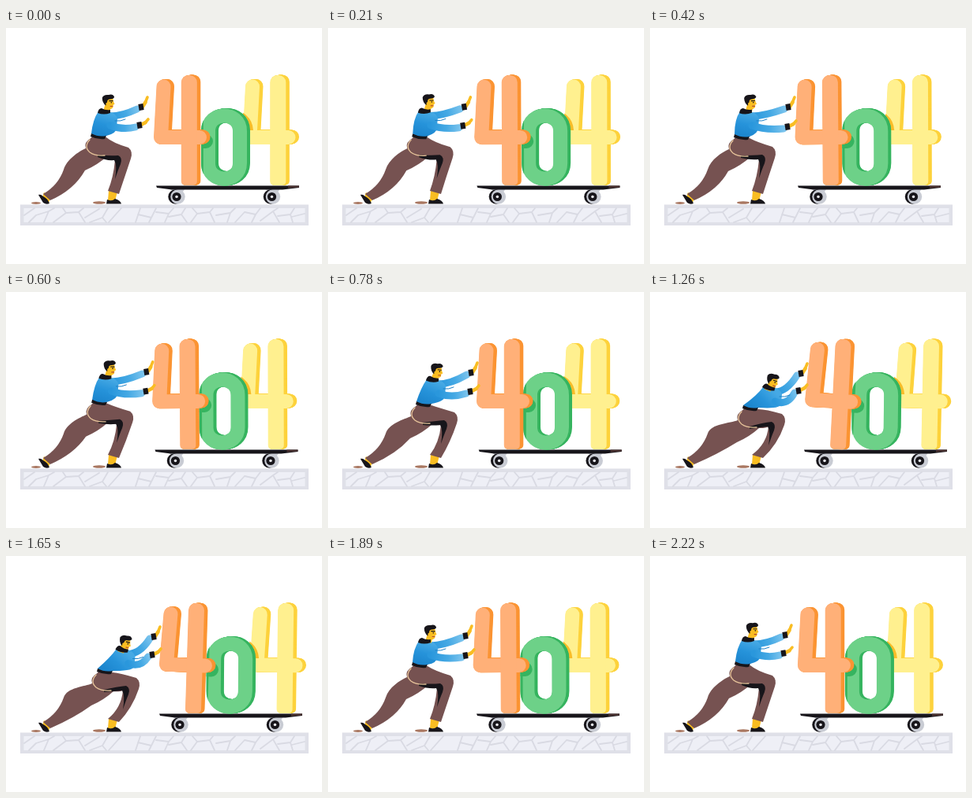
Animation of 400x300 px, one loop 2.25 s. Source, as an HTML page with a canvas:

```html
<!DOCTYPE html>
<html lang="en">
<head>
<meta charset="utf-8">
<title>404</title>
<style>
  html, body { margin: 0; width: 100%; height: 100%; overflow: hidden; background: #fff; }
  canvas { display: block; width: 400px; height: 300px; }
</style>
</head>
<body>
<canvas id="stage"></canvas>
<script>
const LOOP = 2250, STEP = 30;
const TIMES = [0, 420, 780, 1260, 1650, 1890];

// One value (or point) per entry in TIMES; the loop closes on the first.
const TRACKS = {
  deck: [0, -3, 0.7, 5, 4, -2],
  four: [0, -3, 1, 6, 5, -3],
  lean: [0, -0.4, 0, 2.9, 1.8, -0.3],
  zero: [0, -3.6, 0, 8.3, 6.6, -3.5],
  last: [0, -2, -1.7, 9, 8.2, -2.4],
  head: [[129, 95], [126.5, 95], [137, 101], [154, 114], [150, 111], [129, 98]],
  neck: [[123, 107], [120, 107], [131, 112], [149, 122], [145.5, 119.5], [121, 109]],
  hip: [[114, 137], [113, 138], [118, 142], [124, 147], [122, 146], [113, 138]],
  knee: [[151, 160], [151, 159], [156, 161], [163, 163], [161, 163], [151, 160]],
  cuffA: [[171, 102], [175, 102], [181, 104], [191, 105], [187, 104], [174, 103]],
  cuffB: [[169, 125], [174, 127], [180, 128], [188, 127], [185, 127], [174, 128]]
};

const INK = '#17151a', SKIN = '#f9bd22', CLOTH = '#765251', MUD = '#a97761';
const canvas = document.getElementById('stage');
const c = canvas.getContext('2d');
const ratio = window.devicePixelRatio || 1;
canvas.width = 400 * ratio;
canvas.height = 300 * ratio;

// Periodic cubic through uneven keys.
function spline(values, t) {
  const n = TIMES.length;
  const wrap = i => (i + n) % n;
  const at = i => TIMES[wrap(i)] + Math.floor(i / n) * LOOP;
  const val = i => values[wrap(i)];
  let i = n - 1;
  while (t < TIMES[i]) i--;
  const span = at(i + 1) - at(i), u = (t - at(i)) / span;
  const slope = k => (val(k + 1) - val(k - 1)) / (at(k + 1) - at(k - 1)) * span;
  const v = 1 - u;
  return val(i) * v * v * (1 + 2 * u) + slope(i) * u * v * v +
         val(i + 1) * u * u * (3 - 2 * u) - slope(i + 1) * u * u * v;
}

function pose(t) {
  const p = {};
  for (const [name, keys] of Object.entries(TRACKS)) {
    p[name] = Array.isArray(keys[0])
      ? [0, 1].map(k => spline(keys.map(q => q[k]), t))
      : spline(keys, t);
  }
  return p;
}

const off = (p, x, y) => [p[0] + x, p[1] + y];

function fill(d, color) {
  c.fillStyle = color;
  c.fill(new Path2D(d));
}

function stroke(d, color, width, cap = 'round') {
  c.strokeStyle = color;
  c.lineWidth = width;
  c.lineCap = cap;
  c.lineJoin = 'round';
  c.stroke(new Path2D(d));
}

function disc(x, y, r, color) {
  c.fillStyle = color;
  c.beginPath();
  c.arc(x, y, r, 0, Math.PI * 2);
  c.fill();
}

function oval(x, y, rx, ry, color) {
  c.fillStyle = color;
  c.beginPath();
  c.ellipse(x, y, rx, ry, 0, 0, Math.PI * 2);
  c.fill();
}

function layer(x, y, angle, draw) {
  c.save();
  c.translate(x, y);
  c.rotate(angle);
  draw();
  c.restore();
}

function blend(from, to, ...stops) {
  const g = c.createLinearGradient(...from, ...to);
  stops.forEach((s, i) => g.addColorStop(i / (stops.length - 1), s));
  return g;
}

function pavement() {
  fill('M18 224.5H383V251H18Z', '#dfe0e8');
  fill('M22.5 229H378.5V247H22.5Z', '#eeeff6');
  stroke('M23 238L36 229M29 247L38 238L54 233L61 229M54 233L48 247' +
    'M60 247L76 235L92 234L98 229M76 235L72 229M92 234L100 247M100 241L118 230' +
    'M106 247L122 241L129 229M122 241L127 247M130 247L146 229' +
    'M164 247L170 229M167 237L184 241L190 229M184 241L181 247' +
    'M190 234L206 236L212 229M206 236L201 247M206 240L222 237L229 247M222 237L227 229' +
    'M234 247L242 236L258 234L262 229M242 236L236 229M258 234L264 247' +
    'M266 238L284 235L290 229M284 235L280 247M290 247L302 234L316 237L322 229' +
    'M316 237L311 247M322 245L338 233L344 229M338 233L346 247M344 239L360 237L365 229' +
    'M360 237L363 247M362 240L378 236', '#d9dae3', 1.8);
}

function board(x) {
  layer(x, 0, 0, () => {
    for (const w of [216, 336.5]) {
      fill(`M${w - 8} 205H${w + 10}L${w + 6} 211H${w - 2}Z`, '#c9ccd4');
      disc(w - 1.5, 214.5, 9.2, INK);
      disc(w + 1.5, 214.5, 9.2, '#c9ccd4');
      disc(w, 214.5, 5.6, INK);
      disc(w, 214.5, 1.8, '#e8e9ee');
    }
    fill('M190 200.5H371V203L350 205.5H210L191 203Z', INK);
    fill('M357 200.5H371V202.5L357 203.5Z', '#4a3231');
  });
}

function fourShape(color) {
  stroke('M-33.5 -126.5L-37 -62H12', color, 18);
  c.fillStyle = color;
  c.beginPath();
  c.roundRect(-11.2, -141, 20, 140, [9, 9, 5, 5]);
  c.fill();
}

// Depth is built from shifted copies running to the right.
function extrude(depth, shape, face, side) {
  for (let k = depth; k > 0; k -= 0.5) layer(k, -k / 8, 0, () => shape(side));
  shape(face);
}

const zeroPath = r => `M${-r} -70C${-r} -96 ${r} -96 ${r} -70V-29C${r} -3 ${-r} -3 ${-r} -29Z`;
const zeroShape = color => stroke(zeroPath(20), color, 18);

function digits(p) {
  const lean = p.lean * Math.PI / 180;
  const first = [233 + p.four, 201, lean];
  const middle = [276 + p.zero, 201, lean * 0.25];
  const third = [345.5 + p.last, 201, lean * 0.4];

  layer(...third, () => extrude(4.5, fourShape, '#fff08f', '#fdd23c'));
  c.save();
  c.beginPath();
  c.rect(300 + p.last, 90, 22, 40);
  c.clip();
  layer(middle[0] + 8, middle[1] + 1, middle[2], () => zeroShape('#f9bd28'));
  c.restore();

  layer(...middle, () => extrude(4, zeroShape, '#6dd188', '#36b45f'));
  c.save();
  c.translate(middle[0], middle[1]);
  c.clip(new Path2D('M-29 -70C-29 -108 29 -108 29 -70V-29C29 9 -29 9 -29 -29Z'));
  c.translate(-middle[0], -middle[1]);
  layer(first[0] + 8, first[1] + 5, lean, () => fourShape('#36b45f'));
  c.restore();

  layer(...first, () => extrude(4.5, fourShape, '#ffb078', '#fb9433'));
}

function legs(hip, knee) {
  const h = (x, y) => off(hip, x, y), k = (x, y) => off(knee, x, y);

  oval(38, 222.5, 6, 1.5, MUD);
  fill('M48 209L57 215L54 222L46 216Z', SKIN);
  fill('M41 212Q44 211 47 214Q53 217 55 223Q51 225 47 222Z', INK);

  fill(`M${h(-5, 2)}Q${h(-16, 8)} ${h(-13, 16)}C${h(-22, 20)} 77 167 73 180` +
    `Q66 200 47 211L56 219Q86 206 ${h(-14, 44)}Q${h(2, 37)} ${h(14, 26)}L${h(10, 8)}Z`, CLOTH);

  oval(118, 222, 8, 1.7, MUD);
  fill('M130 207L141 208L138 220L129 219Z', SKIN);
  fill('M128 218Q134 221 138 217Q145 219 146 223.5H127Z', INK);

  fill(`M${h(-5, 1)}L${h(13, 2)}Q${k(-16, -14)} ${k(4, -8)}Q${k(10, -3)} ${k(7, 6)}` +
    `Q${k(-1, 30)} 143 211L129 207Q${k(-15, 30)} ${k(-13, 8)}` +
    `Q${h(20, 28)} ${h(-4, 24)}Q${h(-16, 17)} ${h(-5, 1)}Z`, CLOTH);
  fill(`M${h(2, 24)}Q${k(-20, 3)} ${k(-9, 2)}Q${k(-3, 5)} ${k(-6, 13)}` +
    `Q${k(-9, 20)} ${k(-13, 32)}Q${k(-10, 14)} ${k(-14, 8)}Q${k(-24, 9)} ${h(2, 27)}Z`, INK);
  stroke(`M${h(-8, 5)}Q${h(-16, 14)} ${h(-8, 21)}Q${h(-1, 26)} ${h(11, 25)}`, '#e8c59b', 1.3);
}

function hand(cuff, dx, dy) {
  const p = (x, y) => off(cuff, x, y);
  stroke(`M${p(2, -2)}L${p(dx * 0.7, dy * 0.55)}`, SKIN, 4.5);
  stroke(`M${p(dx * 0.65, dy * 0.5)}L${p(dx, dy)}`, SKIN, 3.6);
}

function arm(from, bend, cuff) {
  const tone = blend(from, cuff, '#2a97dc', '#45a9e4', '#86c9ef');
  stroke(`M${from}Q${bend} ${off(cuff, -5, 1)}`, tone, 9);
  stroke(`M${off(cuff, -3, -1)}L${off(cuff, 3, -2)}`, INK, 8, 'butt');
}

function face(head, tilt) {
  layer(head[0], head[1], tilt, () => {
    c.scale(0.9, 0.9);
    fill('M-4 3L4 7L2 14L-7 13Z', SKIN);
    fill('M-3 -6H7L8 -1L9.5 2L7.5 3L7 7Q3 11 0 8L-4 3Z', SKIN);
    fill('M-8 -7Q-6 -12 1 -11Q7 -13 9 -8Q8 -5 3 -5Q-1 -5 -1 -1L-3 4Q-8 0 -8 -7Z', INK);
    disc(-1, 1.5, 1.8, SKIN);
    stroke('M2 -2.6H6.8', INK, 1.2);
    disc(4.8, -0.3, 0.9, INK);
    stroke('M3.5 5H6.5', '#b4482d', 1.3);
  });
}

function person(p) {
  const { head, neck, hip, knee, cuffA, cuffB } = p;
  const n = (x, y) => off(neck, x, y), h = (x, y) => off(hip, x, y);
  const tilt = (head[0] - 129) * 0.011;

  legs(hip, knee);
  hand(cuffA, 8, -14);
  hand(cuffB, 11, -9);
  arm(n(9, 5), n(24, 5), cuffA);
  fill(`M${h(-6, -3)}L${h(13, 0)}L${h(11, 4)}Q${h(2, 5)} ${h(-7, 1)}Z`, INK);
  fill(`M${n(-6, -1)}Q${n(-13, 9)} ${h(-6, -3)}Q${h(3, 2)} ${h(13, 0)}` +
    `Q${n(17, 27)} ${n(17, 20)}L${n(18, 8)}Q${n(15, 0)} ${n(7, 0)}Z`,
    blend(n(4, 0), h(4, 0), '#46a9e4', '#2693da', '#1c85cd'));
  arm(n(9, 17), n(25, 23), cuffB);
  stroke(`M${n(15, 11)}Q${n(22, 12)} ${n(28, 9)}`, '#1d80c6', 1);
  face(head, tilt);
  layer(neck[0], neck[1], tilt, () => {
    fill('M-7 1Q-6 -5 -2 -5Q3 -2 9 -3L9 1Q1 4 -7 1Z', INK);
  });
}

function draw(t) {
  const p = pose(t);
  c.setTransform(ratio, 0, 0, ratio, 0, 0);
  c.fillStyle = '#fff';
  c.fillRect(0, 0, 400, 300);
  pavement();
  board(p.deck);
  digits(p);
  person(p);
}

const start = performance.now();
function tick() {
  const t = (performance.now() - start) % LOOP;
  draw(Math.floor(t / STEP) * STEP);
  requestAnimationFrame(tick);
}
tick();
</script>
</body>
</html>
```
